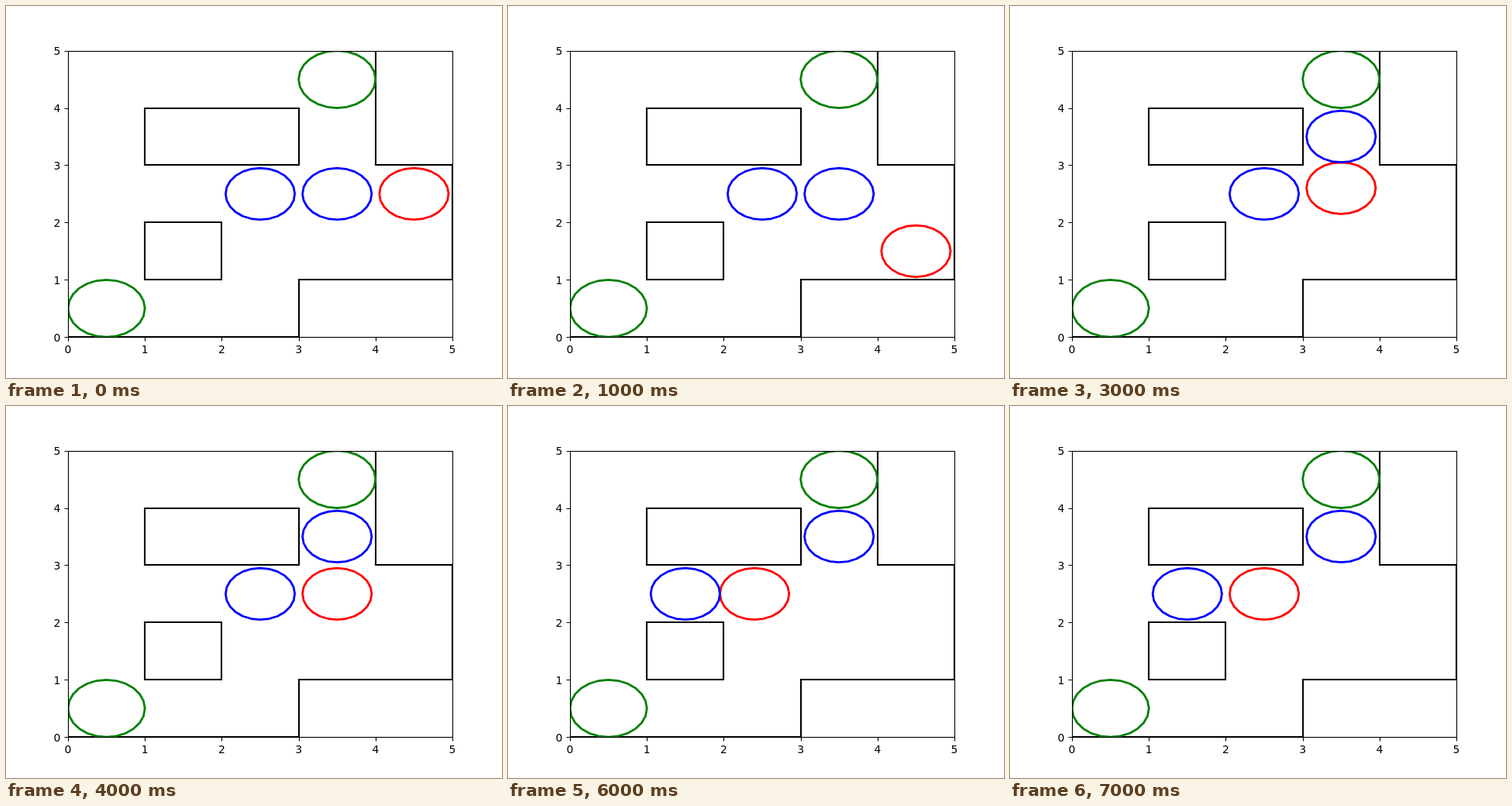
Write an HTML page that moves like this. It is 640 by 480 pixels and loops after 8000 ms.

```html
<!DOCTYPE html>
<html>
<head>
<meta charset="utf-8">
<style>
  html, body { margin: 0; width: 100%; height: 100%; overflow: hidden; background: #fff; }
  svg { display: block; }
  text { font: 13.89px "DejaVu Sans", sans-serif; fill: #000; }
</style>
</head>
<body>
<svg id="stage" width="640" height="480" viewBox="0 0 640 480" fill="none">
  <clipPath id="plot"><rect x="80" y="58" width="496" height="369"/></clipPath>
  <g id="shapes" clip-path="url(#plot)"></g>
  <g id="axes" stroke="#000" stroke-width="1.11"></g>
  <g id="labels"></g>
</svg>
<script>
const NS = 'http://www.w3.org/2000/svg';
const CELL_X = 99.2, CELL_Y = 73.92;
const px = x => 80 + x * CELL_X;
const py = y => 427.2 - y * CELL_Y;

function add(parent, tag, attrs) {
  const el = document.createElementNS(NS, tag);
  for (const k in attrs) el.setAttribute(k, attrs[k]);
  document.getElementById(parent).appendChild(el);
  return el;
}

// Walls lie on whole pixels.
function wall(points) {
  const d = points.map(([x, y]) => Math.round(px(x)) + ' ' + Math.round(py(y)));
  add('shapes', 'path', {
    d: 'M' + d.join('L'), stroke: '#000', 'stroke-width': 2.08, 'stroke-linecap': 'square'
  });
}

const box = (l, b, r, t) => wall([[l, b], [r, b], [r, t], [l, t], [l, b]]);

// A disc is a ring of 24 straight pieces; the last piece has its own caps.
function disc(color, r) {
  const pts = Array.from({ length: 24 }, (_, i) => {
    const a = i * Math.PI / 12;
    return (r * CELL_X * Math.cos(a)).toFixed(2) + ' ' + (-r * CELL_Y * Math.sin(a)).toFixed(2);
  });
  return add('shapes', 'path', {
    d: 'M' + pts.join('L') + 'M' + pts[23] + 'L' + pts[0],
    stroke: color, 'stroke-width': 2.78, 'stroke-linecap': 'square', 'stroke-linejoin': 'round'
  });
}

function place(el, [x, y]) {
  el.setAttribute('transform', `translate(${px(x).toFixed(2)} ${py(y).toFixed(2)})`);
}

wall([[0, 0], [3, 0], [3, 1], [5, 1], [5, 3], [4, 3], [4, 5], [0, 5], [0, 0]]);
box(1, 1, 2, 2);
box(1, 3, 3, 4);

place(disc('#008000', 0.5), [0.5, 0.5]);
place(disc('#008000', 0.5), [3.5, 4.5]);
const robot = disc('#ff0000', 0.45);
const crateA = disc('#0000ff', 0.45);
const crateB = disc('#0000ff', 0.45);

add('axes', 'rect', { x: 80.5, y: 58.5, width: 496, height: 369 });
for (let n = 0; n <= 5; n++) {
  const x = Math.round(px(n)) + 0.5, y = Math.round(py(n)) + 0.5;
  add('axes', 'path', { d: `M${x} 427.5V432.5M80.5 ${y}H75.5` });
  add('labels', 'text', { x: px(n), y: 448, 'text-anchor': 'middle' }).textContent = n;
  add('labels', 'text', { x: 70.3, y: Math.round(py(n) + 5.4), 'text-anchor': 'end' }).textContent = n;
}

// Where the robot stands during each second.
const STEP = 1000;
const route = [
  [4.5, 2.5], [4.5, 1.5], [3.5, 1.6], [3.5, 2.6],
  [3.5, 2.5], [3.4, 2.5], [2.4, 2.5], [2.5, 2.5]
];

function draw(ms) {
  const i = Math.floor(ms / STEP) % route.length;
  place(robot, route[i]);
  place(crateA, [i < 6 ? 2.5 : 1.5, 2.5]);
  place(crateB, [3.5, i < 3 ? 2.5 : 3.5]);
}

let start = null;
function tick(now) {
  if (start === null) start = now;
  draw(now - start);
  requestAnimationFrame(tick);
}
draw(0);
requestAnimationFrame(tick);
</script>
</body>
</html>
```
